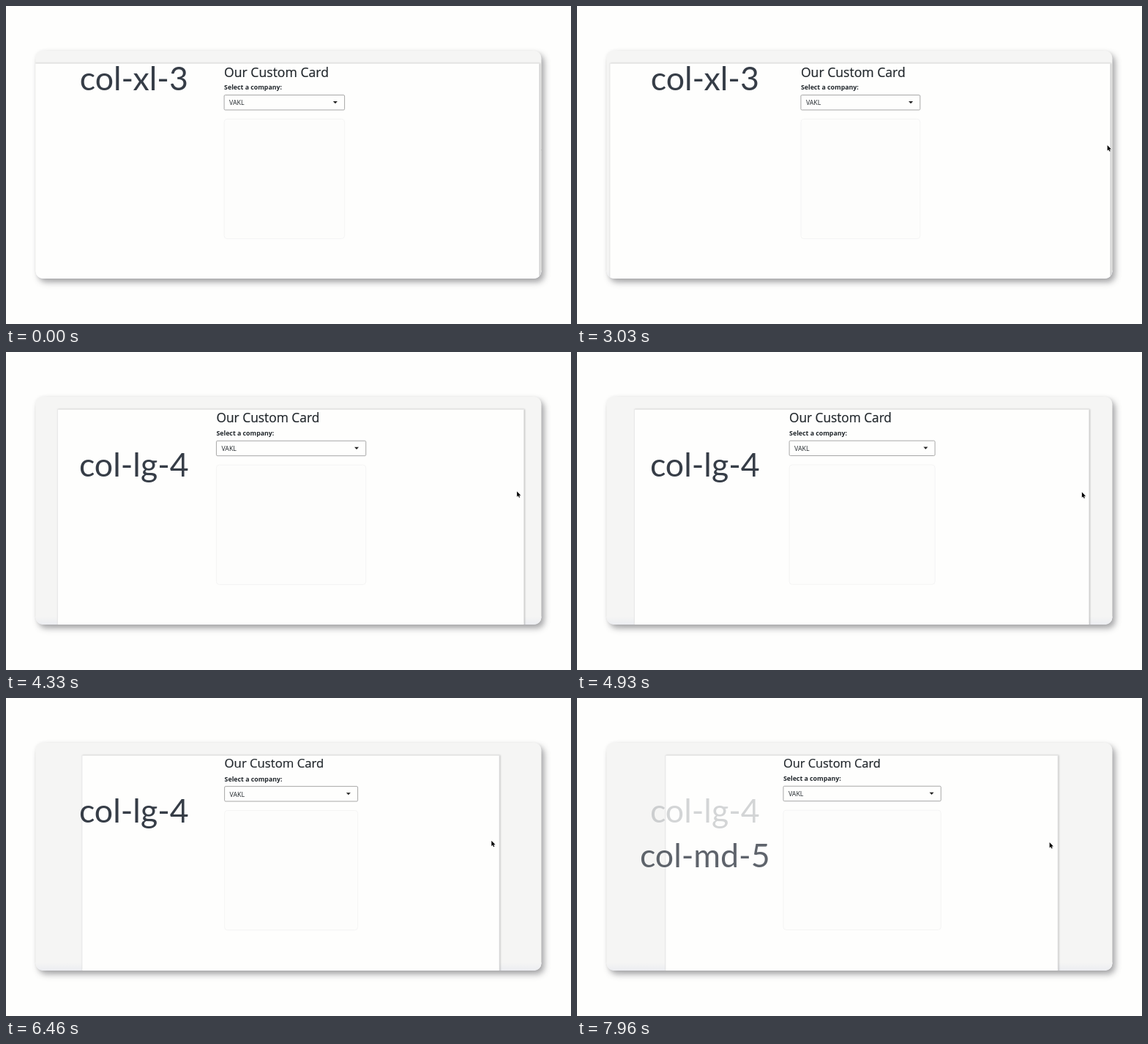
An HTML page that plays this animation: 772x434 px, repeating every 8000 ms.

```html
<!DOCTYPE html>
<html lang="en">
<head>
<meta charset="utf-8">
<title>Responsive card</title>
<style>
  html, body { margin: 0; width: 100%; height: 100%; overflow: hidden; background: #fefefd; }
  svg { display: block; width: 100vw; height: 100vh; }
  text { font-family: "Open Sans", "Noto Sans", sans-serif; fill: #20262b; }
  .labels text { font: 44.7px Lato, sans-serif; fill: #363d47; text-anchor: middle; }
  .shell { filter: drop-shadow(4px 5px 4px rgba(25,25,35,.38)) drop-shadow(0 0 2px rgba(0,0,0,.05)); }
  #page { filter: drop-shadow(1px 0 .8px rgba(0,0,0,.22)); }
  #title { stroke: #20262b; stroke-width: .2; }
</style>
</head>
<body>
<svg viewBox="0 0 772 434">
  <defs>
    <clipPath id="clip"><rect x="40.5" y="61" width="691" height="311" rx="10"/></clipPath>
    <linearGradient id="foot" x2="0" y2="1">
      <stop stop-color="#f5f5f4"/><stop offset="1" stop-color="#ecedf1"/>
    </linearGradient>
  </defs>
  <rect class="shell" x="40.5" y="61" width="691" height="311" rx="10" fill="#f5f5f4"/>
  <g clip-path="url(#clip)">
    <rect x="40" y="361" width="692" height="11" fill="url(#foot)"/>
    <rect id="page" y="78.5" height="310" fill="#fefefd" stroke="#e8e8e8" stroke-width=".8"/>
    <g id="card">
      <text id="title">Our Custom Card</text>
      <g id="form">
        <text y="114.4" font-size="8.8" font-weight="700">Select a company:</text>
        <rect class="fit" y="121.5" height="20.4" rx="1.5" fill="#fefefd" stroke="#999" stroke-width=".85"/>
        <text x="7" y="135.4" font-size="8.8">VAKL</text>
        <path id="caret" fill="#222" d="M-3 130h6l-3 3.2z"/>
        <rect class="fit" y="154.3" height="163.3" rx="4" fill="#fdfdfc" stroke="#f1f1f1" stroke-width=".8"/>
      </g>
    </g>
    <g id="cursor" stroke="#fff" stroke-width=".7" paint-order="stroke">
      <path id="move" d="M0-4.6 2-2.4H.7V-.7H2.4V-2L4.6 0 2.4 2V.7H.7V2.4H2L0 4.6-2 2.4H-.7V.7H-2.4V2L-4.6 0-2.4-2V-.7H-.7V-2.4H-2z"/>
      <path id="arrow" transform="scale(.92)" d="M0 0V8.1L1.8 6.4 3.1 9.3 4.4 8.7 3.1 5.9H5.7z"/>
    </g>
  </g>
  <g class="labels">
    <text x="174.8" y="115.1">col-xl-3</text>
    <text x="174.8" y="169.9">col-lg-4</text>
    <text x="174.8" y="230.8">col-md-5</text>
  </g>
</svg>
<script>
const LOOP = 8000, TO_LG = 3630, TO_MD = 7620, FADE = 430, GRAB = 2700;

// Each pull of the window edge: start, end, distance
const pulls = [
  [2630, 3460, 29], [3630, 4430, 12], [4630, 4930, 6.5], [5100, 5600, 11.5],
  [6060, 6460, 14], [7000, 7100, 5], [7300, 7960, 12]
];

const $ = id => document.getElementById(id);
const set = (el, attrs) => { for (const k in attrs) el.setAttribute(k, attrs[k]); };
const ramp = (t, from, to) => Math.max(0, Math.min(1, (t - from) / (to - from)));
const fits = document.querySelectorAll('.fit');
const labels = document.querySelectorAll('.labels text');

function drawPage(t, left, right) {
  const width = Math.min(right - left, 690);
  const cols = t < TO_LG ? 3 : t < TO_MD ? 4 : 5;
  const cardW = width * cols / 12 - 8;
  const size = Math.min(17.6, 11.2 + .0097 * width);
  const rise = size - 17.6;

  set($('page'), { x: left, width: right - left });
  set($('card'), { transform: `translate(${(left + right - cardW) / 2 + .6} 0)` });
  set($('title'), { 'font-size': size, y: 96.6 + rise * 1.4 });
  set($('form'), { transform: `translate(0 ${rise})` });
  fits.forEach(r => set(r, { width: cardW }));
  set($('caret'), { transform: `translate(${cardW - 12.7} 0)` });
}

function drawCursor(t, left) {
  const x = Math.min(727, 771.5 - 1.04 * left) + 9 * (1 - ramp(t, 300, 600));
  const y = 196.5 - 4.5 * ramp(t, 1230, 1500) - 2 * ramp(t, 2630, 3030)
    + .135 * Math.max(0, left - 69);
  set($('cursor'), { transform: `translate(${x} ${y})` });
  set($('move'), { opacity: t < GRAB ? 1 : 0 });
  set($('arrow'), { opacity: t < GRAB ? 0 : 1 });
}

function draw(t) {
  const left = pulls.reduce((sum, [from, to, by]) => sum + by * ramp(t, from, to), 31);
  drawPage(t, left, Math.min(728.5, 778 - left));
  drawCursor(t, left);

  const lg = ramp(t, TO_LG, TO_LG + FADE), md = ramp(t, TO_MD, TO_MD + FADE);
  [1 - lg, lg - md, md].forEach((opacity, i) => set(labels[i], { opacity }));
}

const start = performance.now();
function tick() {
  draw((performance.now() - start) % LOOP);
  requestAnimationFrame(tick);
}
tick();
</script>
</body>
</html>
```
